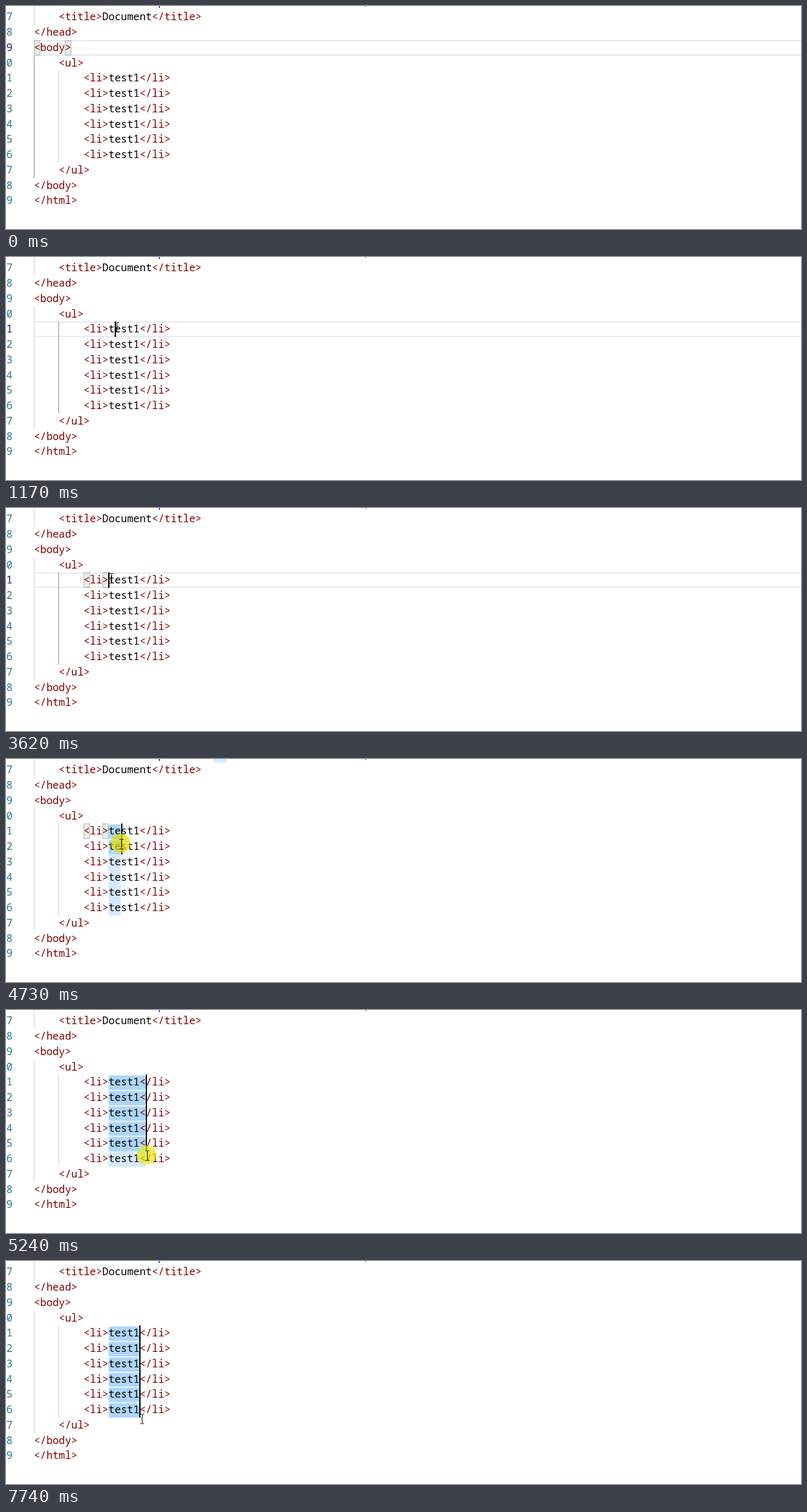
These frames come from a looping animation (1229 by 346 pixels, 8 s). An HTML page:

```html
<!DOCTYPE html>
<html lang="en">
<head>
<meta charset="utf-8">
<title>Column selection</title>
<style>
  html, body { margin: 0; width: 100%; height: 100%; overflow: hidden; background: #fff; }
  svg { display: block; }
  text { font: 16px "Noto Sans Mono", "DejaVu Sans Mono", monospace; font-variant-ligatures: none; white-space: pre; }
</style>
</head>
<body>
<svg id="stage" width="1229" height="346" viewBox="0 0 1229 346"></svg>
<script>
const LOOP = 8000, LEFT = 43.2, CHAR = 9.6, TOP = 5.4, PITCH = 23.75;
const BODY = 2, FIRST = 4, LAST = 9, TEXT_COL = 12;
const TAG = '#800000', ATTR = '#e50000', VALUE = '#0000ff';
const PICK = '#add6ff', MATCH = '#d6eaff', GUIDE = '#d3d3d3', GUIDE_ON = '#939393';
const CLICK = 1110, CLICK2 = 1590, DRAG = 4640, BLINK = 490;

const stage = document.getElementById('stage');
const colX = c => LEFT + c * CHAR;
const rowY = r => Math.round(TOP + r * PITCH);
const baseline = r => rowY(r) + 17;

function set(el, attrs) {
  for (const k in attrs) el.setAttribute(k, attrs[k]);
  return el;
}
function add(tag, attrs, parent = stage) {
  return parent.appendChild(set(document.createElementNS('http://www.w3.org/2000/svg', tag), attrs));
}
const rect = (x, y, width, height, fill, parent) => add('rect', { x, y, width, height, fill }, parent);
const show = (el, on) => el.setAttribute('visibility', on ? 'visible' : 'hidden');

function addLine(row, indent, spans) {
  const line = add('text', { x: colX(indent), y: baseline(row) });
  for (const [s, fill] of spans) add('tspan', { fill }, line).textContent = s;
}
const split = code => code.match(/<[^>]*>|[^<]+/g).map(s => [s, s[0] === '<' ? TAG : '#000']);

// Layers, back to front
const lineBox = add('g', {});
for (const y of [0, 22]) rect(45, y, 1190, 2, '#eaeaea', lineBox);

const headMark = rect(colX(29), 0, 2 * CHAR, rowY(0), MATCH);
const marks = [];
for (let r = FIRST; r <= LAST; r++) marks.push(rect(colX(TEXT_COL), 0, 0, 0, PICK));

const guide = (level, from, to) => rect(Math.floor(colX(level * 4)), rowY(from), 1, rowY(to) - rowY(from), GUIDE);
guide(0, -1, 1);
const outerGuide = guide(0, 3, 11);
const innerGuide = guide(1, FIRST, LAST + 1);

const brackets = [0, 1].map(() => set(rect(0, 0, 9, 23, 'rgba(0,100,0,.1)'), { stroke: '#b9b9b9' }));

const code = ['    <title>Document</title>', '</head>', '<body>', '    <ul>',
  ...Array(6).fill('        <li>test1</li>'), '    </ul>', '</body>', '</html>'];
const numbers = code.map((line, r) => {
  addLine(r, line.search(/\S/), split(line.trim()));
  const num = add('text', { x: 0.5, y: baseline(r) });
  num.textContent = (r + 7) % 10;
  return num;
});
addLine(-1, 4, [['<meta', TAG], [' name', ATTR], ['=', TAG], ['"viewport"', VALUE], [' content', ATTR],
  ['=', TAG], ['"width=device-width, initial-scale=1.0"', VALUE], ['>', TAG]]);

const caret = rect(0, 0, 2, 0, '#000');
const halo = add('circle', { r: 15 });
const beam = add('path', {
  d: 'M-3 -7.5h2.2l.8 .8l.8 -.8h2.2M0 -6.7V6.7M-3 7.5h2.2l.8 -.8l.8 .8h2.2',
  fill: 'none', stroke: '#000'
});

// Pointer glides: end time, duration, x, y, ease-out power
const glides = [
  [840, 790, 172, 105, 2.6], [890, 30, 171, 109], [1410, 60, 158, 110], [2140, 90, 163, 109],
  [4460, 20, 161, 109], [4730, 90, 178, 132], [5240, 510, 218, 226], [5570, 330, 215, 236],
  [5810, 50, 209, 242], [5990, 30, 210, 245]
];
function pointer(t) {
  let x = 1126, y = 340;
  for (const [end, span, gx, gy, power = 1] of glides) {
    const u = Math.min(1, Math.max(0, 1 - (end - t) / span));
    const k = 1 - (1 - u) ** power;
    x += (gx - x) * k;
    y += (gy - y) * k;
  }
  return [Math.round(x), Math.round(y)];
}

const presses = [[1080, 1170], [1570, 1720], [4460, 6350]];

function drawHalo(t, x, y) {
  const press = presses.find(([from, to]) => t >= from && t < to);
  show(halo, press);
  if (!press) return;
  const k = (t - press[0]) / (press[1] - press[0]);
  set(halo, {
    cx: x - 1, cy: y - 1,
    fill: `rgb(${225 + 30 * k},${215 + 40 * k},0)`,
    'fill-opacity': 0.75 - 0.2 * k
  });
}

function drawSelection(cols, end) {
  marks.forEach((mark, i) => {
    const r = FIRST + i, gap = r <= end ? 1.5 : 0;
    set(mark, {
      y: rowY(r) + gap,
      width: cols * CHAR,
      height: rowY(r + 1) - rowY(r) - gap,
      rx: gap * 2,
      fill: gap ? PICK : MATCH
    });
  });
  show(headMark, cols === 2);
}

function drawCaret(t, cols, end) {
  const since = t < CLICK2 ? CLICK : t < DRAG ? 1650 : 5775;
  const phase = Math.floor(Math.max(0, t - since) / BLINK);
  set(caret, {
    x: Math.round(colX(TEXT_COL + cols)),
    y: rowY(FIRST),
    height: rowY(end + 1) - rowY(FIRST)
  });
  show(caret, t >= CLICK && phase % 2 === 0);
}

function draw(t) {
  const [px, py] = pointer(t);
  const before = t < CLICK, dragging = t >= DRAG;
  const row = before ? BODY : FIRST;
  let cols = 0, end = FIRST;
  if (dragging) {
    cols = Math.max(0, Math.round((px - colX(TEXT_COL)) / CHAR));
    end = Math.max(FIRST, Math.min(LAST, Math.floor((py - 7 - TOP) / PITCH)));
  }
  drawSelection(cols, end);
  drawCaret(t, t < CLICK2 ? 1 : cols, end);

  lineBox.setAttribute('transform', `translate(0 ${rowY(row)})`);
  show(lineBox, !dragging);
  numbers.forEach((n, r) => n.setAttribute('fill', r === row && !dragging ? '#0b216f' : '#237893'));
  outerGuide.setAttribute('fill', before ? GUIDE_ON : GUIDE);
  innerGuide.setAttribute('fill', before || dragging ? GUIDE : GUIDE_ON);

  const pair = before ? [0, 5] : [8, 11];
  brackets.forEach((b, i) => {
    set(b, { x: Math.round(colX(pair[i])) + 0.5, y: rowY(row) + 0.5 });
    show(b, before || (t >= CLICK2 && cols < 3));
  });

  drawHalo(t, px, py);
  beam.setAttribute('transform', `translate(${px + 0.5} ${py})`);
  show(beam, t >= 50);
}

const start = performance.now();
function tick() {
  draw((performance.now() - start) % LOOP);
  requestAnimationFrame(tick);
}
tick();
</script>
</body>
</html>
```
